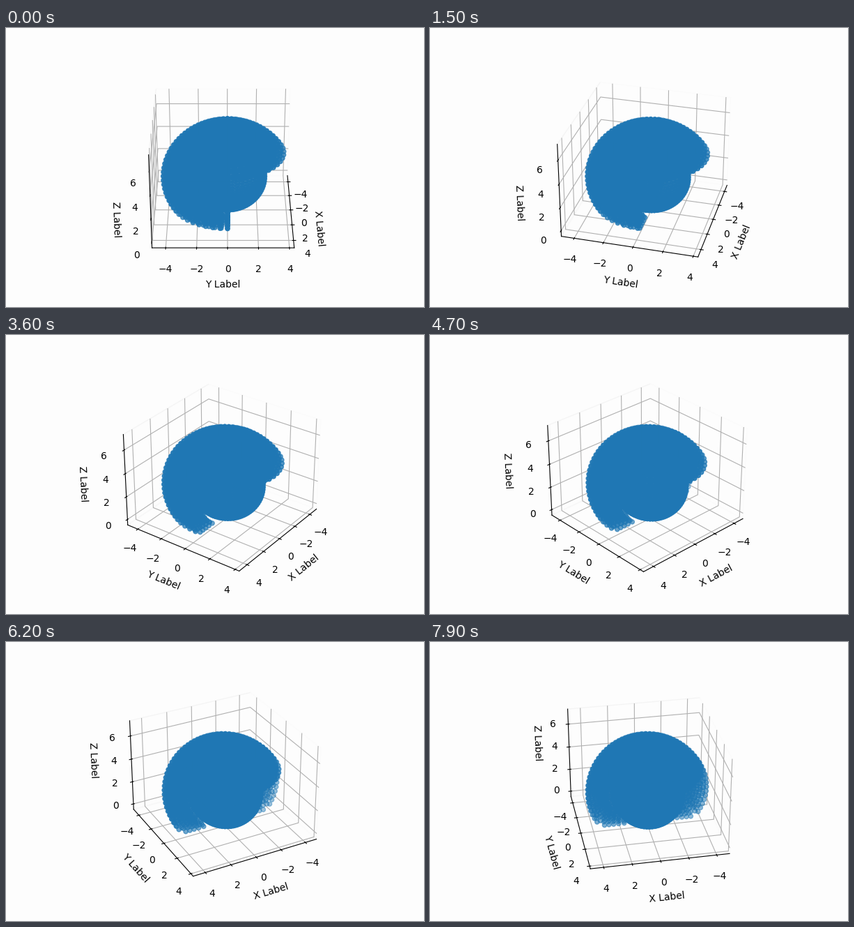
A matplotlib script that plays this animation: 600 by 400 pixels, repeating every 8000 ms.

```python
import numpy as np
import matplotlib.pyplot as plt
from matplotlib.animation import FuncAnimation

FRAMES = 80
PAPER = "#fdfdfd"
BASE = 2.5        # height of the shoulder
REACH = 4.3       # radius of the outer shell
CORE = 2.5        # radius of the inner sphere
TURN = np.radians(np.linspace(-180, 0, 25))


def sweep(radius, elev):
    """Points of one arc in the upright plane, turned about the z axis."""
    turn, elev = np.meshgrid(TURN, elev)
    flat = radius * np.cos(elev)
    points = flat * np.cos(turn), flat * np.sin(turn), BASE + radius * np.sin(elev)
    return np.array([p.ravel() for p in points])


def build_cloud():
    stop = np.radians(150)
    parts = [sweep(CORE, np.radians(np.arange(-90, 270, 5)))]
    for radius in np.arange(3.05, 4.1, 0.25):
        parts.append(sweep(radius, np.linspace(-np.arcsin(BASE / radius), stop, 26)))
    parts.append(sweep(REACH, np.linspace(np.radians(-30), stop, 37)))
    return np.hstack(parts)


def padded(low, high):
    pad = (high - low) * (1.1 * 25 / 24 - 1) / 2
    return low - pad, high + pad


fig = plt.figure(figsize=(6, 4), dpi=100, facecolor=PAPER)
ax = fig.add_subplot(projection="3d", facecolor=PAPER)
ax.scatter(*build_cloud(), color="#1f77b4")

ax.set_xlim(*padded(-REACH, REACH))
ax.set_ylim(*padded(-REACH, REACH * np.cos(np.radians(30))))
ax.set_zlim(*padded(0, BASE + REACH))
ax.set_xlabel("X Label")
ax.set_ylabel("Y Label")
ax.set_zlabel("Z Label")

for axis, edge in ((ax.xaxis, 0.98), (ax.yaxis, 0.93), (ax.zaxis, 0.98)):
    axis.pane.set_facecolor(PAPER)
    axis.pane.set_edgecolor((edge,) * 3)


def update(i):
    # a hair above zero keeps the axes on the same sides in every view
    ax.view_init(elev=30, azim=i + 0.01)
    return ()


anim = FuncAnimation(fig, update, frames=FRAMES, interval=100, repeat=True,
                     repeat_delay=0, blit=False)
plt.show()
```
